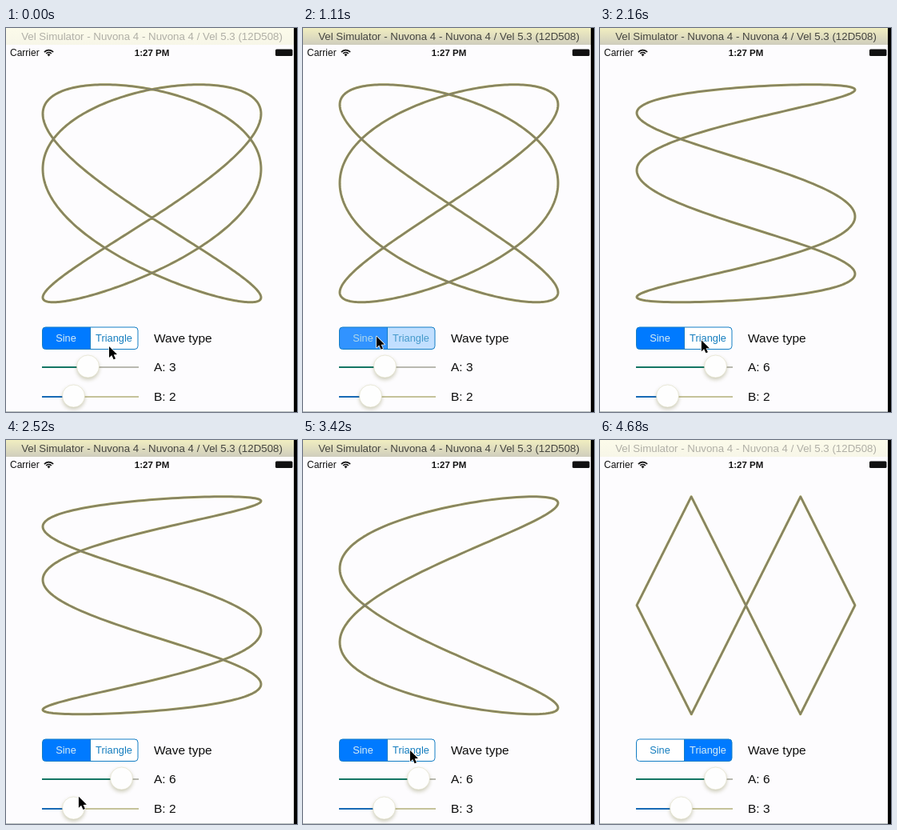
Animation, 364 px wide and 480 px high, one loop 4.71 s. Source, as an HTML page with a canvas:

```html
<!DOCTYPE html>
<html lang="en">
<head>
<meta charset="utf-8">
<title>Lissajous curves</title>
<style>
  html, body { margin: 0; width: 100%; height: 100%; overflow: hidden; background: #fdfcfe; }
  canvas { display: block; width: 364px; height: 480px; }
</style>
</head>
<body>
<canvas id="stage" width="364" height="480"></canvas>
<script>
const ctx = document.getElementById('stage').getContext('2d');
const LOOP = 4710;
const FONT = '"Liberation Sans", Arial, sans-serif';
const BLUE = '#007aff';

// Keys are [time, value...]; values in between are linear.
const phaseKeys = [[0, 25.5], [990, 36.8], [2160, 36.8], [2910, 45.1], [3479, 51], [3480, 75], [3930, 79.1], [4680, 85.9]];
const thumbAKeys = [[1400, 102.5], [1900, 144.5]];
const thumbBKeys = [[2640, 84.5], [2860, 101.5]];
const cursorKeys = [
  [0, 129, 398], [300, 130, 391], [450, 128, 389], [660, 100, 387], [900, 92, 385.5],
  [1130, 92, 385.5], [1380, 103, 420], [1400, 103, 420], [1900, 145, 420], [1980, 145, 420],
  [2160, 127, 390], [2580, 85, 455], [2640, 85, 455], [2860, 101, 455], [3000, 101, 455],
  [3380, 134, 388], [3560, 134, 388], [3880, 260, 500]
];
const waveSwitches = [300, 1020, 3480];
const FADE = 180;

function keyed(keys, t) {
  if (t <= keys[0][0]) return keys[0].slice(1);
  for (let i = 1; i < keys.length; i++) {
    const a = keys[i - 1], b = keys[i];
    if (t < b[0]) {
      const p = (t - a[0]) / (b[0] - a[0]);
      return a.slice(1).map((v, k) => v + (b[k + 1] - v) * p);
    }
  }
  return keys[keys.length - 1].slice(1);
}

const sliderValue = x => Math.floor(1 + (x - 61) / 15);
const triangle = cycles => 2 / Math.PI * Math.asin(Math.sin(2 * Math.PI * cycles));

function text(str, x, y, size, color, align = 'left', weight = 'normal') {
  ctx.font = `${weight} ${size}px ${FONT}`;
  ctx.textAlign = align;
  ctx.fillStyle = color;
  ctx.fillText(str, x, y);
}

function drawTitle(active) {
  const g = ctx.createLinearGradient(0, 0, 0, 21);
  g.addColorStop(0, active ? '#f1eec0' : '#fcfbea');
  g.addColorStop(1, active ? '#cfcdbd' : '#f7f6e8');
  ctx.fillStyle = g;
  ctx.fillRect(0, 0, 364, 21);
  text('Vel Simulator - Nuvona 4 - Nuvona 4 / Vel 5.3 (12D508)', 182.5, 15, 13.3,
    active ? '#45453f' : '#b0afa6', 'center');
}

function drawStatus() {
  text('Carrier', 5, 35, 12, '#111');
  text('1:27 PM', 182.5, 35, 11.5, '#111', 'center', 'bold');
  ctx.strokeStyle = ctx.fillStyle = '#111';
  ctx.lineWidth = 1.6;
  for (const r of [4.4, 7.4]) {
    ctx.beginPath();
    ctx.arc(53.5, 35, r, -Math.PI * 0.77, -Math.PI * 0.23);
    ctx.stroke();
  }
  ctx.beginPath();
  ctx.moveTo(53.5, 35.5);
  ctx.arc(53.5, 35, 2.6, -Math.PI * 0.77, -Math.PI * 0.23);
  ctx.fill();
  ctx.beginPath();
  ctx.roundRect(337, 26.5, 21.5, 8.5, 1.5);
  ctx.fill();
}

function drawCurve(isTriangle, a, b, degrees) {
  const phase = degrees * Math.PI / 180;
  const end = isTriangle ? a * b : 2 * Math.PI;
  const steps = isTriangle ? 3600 : 720;
  ctx.beginPath();
  for (let i = 0; i < steps; i++) {
    const s = end * i / steps;
    const x = isTriangle ? triangle((s + phase) / a) : Math.sin(a * s + phase);
    const y = isTriangle ? triangle(s / b) : Math.cos(b * s);
    ctx.lineTo(182.5 + 136.5 * x, 206.75 - 136 * y);
  }
  ctx.closePath();
  ctx.lineJoin = 'round';
  ctx.lineWidth = 3;
  ctx.strokeStyle = '#97934f';
  ctx.stroke();
  ctx.lineWidth = 1.2;
  ctx.strokeStyle = '#7f7d70';
  ctx.stroke();
}

function drawSegment(label, x, w, fill) {
  ctx.globalAlpha = fill;
  ctx.fillStyle = BLUE;
  ctx.fillRect(x, 374, w, 28);
  ctx.globalAlpha = 1;
  const mix = (from, to) => Math.round(from + (to - from) * fill);
  const color = `rgb(${mix(20, 215)},${mix(125, 238)},${mix(190, 245)})`;
  text(label, x + w / 2 - 0.5, 391.5, 12.8, color, 'center');
}

function drawSegments(triangleOn, progress) {
  const incoming = Math.min(1, progress * 1.6), outgoing = (1 - progress) ** 2;
  ctx.save();
  ctx.beginPath();
  ctx.roundRect(45.5, 374, 119.5, 27.5, 4);
  ctx.fillStyle = '#fff';
  ctx.fill();
  ctx.save();
  ctx.clip();
  drawSegment('Sine', 45.5, 60, triangleOn ? outgoing : incoming);
  drawSegment('Triangle', 105.5, 60, triangleOn ? incoming : outgoing);
  ctx.restore();
  ctx.lineWidth = 1;
  ctx.strokeStyle = '#137dc4';
  ctx.stroke();
  ctx.beginPath();
  ctx.moveTo(105.5, 374);
  ctx.lineTo(105.5, 402);
  ctx.stroke();
  ctx.restore();
}

function drawSlider(x, y, left, right) {
  ctx.fillStyle = right;
  ctx.fillRect(x, y, 166 - x, 2);
  ctx.fillStyle = left;
  ctx.fillRect(45, y, x - 45, 2);
  ctx.save();
  ctx.shadowColor = 'rgba(100,95,30,0.32)';
  ctx.shadowBlur = 5;
  ctx.shadowOffsetY = 2.5;
  ctx.fillStyle = '#fefefe';
  ctx.beginPath();
  ctx.arc(x, y, 14, 0, 2 * Math.PI);
  ctx.fill();
  ctx.restore();
  ctx.lineWidth = 0.5;
  ctx.strokeStyle = '#d8d6b8';
  ctx.stroke();
}

function drawCursor(x, y) {
  ctx.save();
  ctx.translate(x, y);
  ctx.beginPath();
  for (const [px, py] of [[0, 0], [0, 14], [3.2, 11], [5.6, 16.2], [8, 15.2], [5.7, 10.2], [10, 10]])
    ctx.lineTo(px, py);
  ctx.closePath();
  ctx.lineWidth = 1.5;
  ctx.lineJoin = 'round';
  ctx.strokeStyle = '#fff';
  ctx.stroke();
  ctx.fillStyle = '#000';
  ctx.fill();
  ctx.restore();
}

function draw(t) {
  const thumbA = keyed(thumbAKeys, t)[0], thumbB = keyed(thumbBKeys, t)[0];
  const a = sliderValue(thumbA), b = sliderValue(thumbB);
  const passed = waveSwitches.filter(s => t >= s);
  const isTriangle = passed.length % 2 === 1;
  const progress = passed.length ? Math.min(1, (t - passed[passed.length - 1]) / FADE) : 1;

  ctx.fillStyle = '#fdfcfe';
  ctx.fillRect(0, 0, 364, 480);
  drawTitle(t >= 300 && t < 4500);
  drawStatus();
  drawCurve(isTriangle, a, b, keyed(phaseKeys, t)[0]);
  drawSegments(isTriangle, progress);
  text('Wave type', 185, 392.5, 15.5, '#0c0c0c');
  text('A: ' + a, 185, 428.5, 15.5, '#0c0c0c');
  text('B: ' + b, 185, 465.5, 15.5, '#0c0c0c');
  drawSlider(thumbA, 423, '#147564', '#b9b9b0');
  drawSlider(thumbB, 460, '#1769b5', '#c5c29a');
  ctx.fillStyle = '#b9c0c0';
  ctx.fillRect(0, 479, 360, 1);
  ctx.fillStyle = '#000';
  ctx.fillRect(360, 0, 4, 480);
  drawCursor(...keyed(cursorKeys, t));
}

const start = performance.now();
function tick() {
  draw((performance.now() - start) % LOOP);
  requestAnimationFrame(tick);
}
tick();
</script>
</body>
</html>
```
